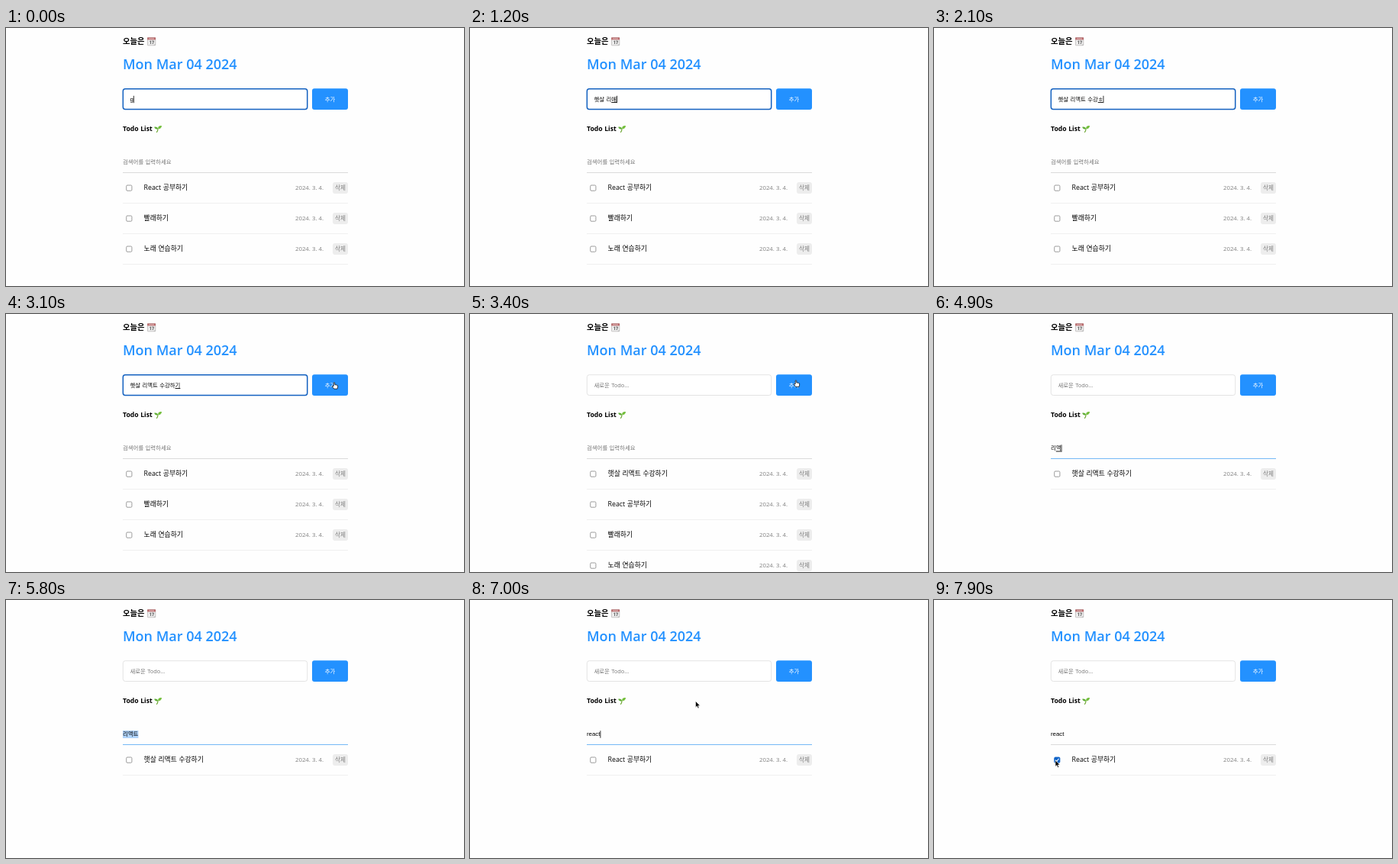
Recreate the animation shown at these times as an HTML page. Size 600x338 px, loop 8 s.

```html
<!DOCTYPE html>
<html lang="ko">
<head>
<meta charset="utf-8">
<title>Todo List</title>
<style>
  html, body { margin: 0; width: 100%; height: 100%; overflow: hidden; background: #fefefe; }
  svg { display: block; width: 600px; height: 338px; }
  text {
    font-family: "Open Sans", "Noto Sans CJK KR", "Noto Sans CJK JP", sans-serif;
    white-space: pre; word-spacing: .4px; fill: #000;
  }
  .today { font-size: 10.3px; font-weight: 700; }
  .date { font-size: 18px; font-weight: 600; fill: #2391ff; word-spacing: 0; }
  .title { font-size: 8.65px; font-weight: 700; }
  .field { font-size: 7.4px; }
  .latin { font-family: "Liberation Sans", Arial, sans-serif; font-size: 7.87px; }
  .hint { fill: #757575; }
  .add { font-size: 7.4px; font-weight: 500; fill: #fff; }
  .item { font-size: 8.8px; font-weight: 500; }
  .day { font-size: 7.8px; fill: #808080; word-spacing: 0; }
  .del { font-size: 7.6px; fill: #808080; }
</style>
</head>
<body>
<svg id="stage" viewBox="0 0 600 338">
  <text class="today" x="153" y="21.2">오늘은</text>
  <g transform="translate(185 12)">
    <rect x=".4" y=".6" width="10.4" height="10.2" rx=".8" fill="#ececec" stroke="#a9a6a6" stroke-width=".6"/>
    <path d="M.2 .4H11V3.4H.2Z" fill="#b9686a"/>
    <path d="M2 1.9H9" stroke="#f3dede" stroke-width=".7"/>
    <path d="M3.4 5.6L4.6 4.9V9M6.2 5.1H8.6L7.1 9" fill="none" stroke="#555" stroke-width=".9"/>
    <path d="M8.2 10.8L10.8 8.4V10.8Z" fill="#bdbdbd"/>
  </g>
  <text class="date" x="153" y="54">Mon Mar 04 2024</text>
  <rect id="box" x="153.3" y="79.7" width="241.4" height="26.8" rx="3"/>
  <rect x="401" y="79.3" width="47" height="27.7" rx="3" fill="#2391ff"/>
  <text class="add" x="424.6" y="95.8" text-anchor="middle">추가</text>
  <text class="title" x="153" y="135">Todo List</text>
  <g transform="translate(194 127)">
    <path d="M3.2 9.8C4.6 8.6 5 7 5.2 4.6" fill="none" stroke="#6aa52f" stroke-width="1.1"/>
    <path d="M5.1 5.4C1.8 6.2 .6 4.6 .3 2.6C3 2 5 3 5.1 5.4Z" fill="#5fae35"/>
    <path d="M5.2 4.8C5 1.6 7 .6 10 1C10 3.8 8 5.6 5.2 4.8Z" fill="#74bf3c"/>
  </g>
  <rect id="line" x="153" y="189" width="295" height="1"/>
  <g id="fields"></g>
  <g id="list"></g>
  <g id="cursor">
    <path id="arrow" d="M0 0V8.2L1.9 6.5L3.2 9.4L4.6 8.8L3.3 5.9H5.9Z" fill="#000" stroke="#fff" stroke-width=".6"/>
    <path id="beam" d="M-2 -4.5Q0 -4.5 0 -3.4Q0 -4.5 2 -4.5M0 -3.4V3.6M-2 4.6Q0 4.6 0 3.5Q0 4.6 2 4.6M-1.1 1.2H1.1" fill="none" stroke="#222" stroke-width=".9"/>
    <path id="hand" d="M-.8 .6Q0 -.5 .8 .6V3.2L2 3.3L3.3 3.6L4.6 4.2Q5 6.4 4 8.6H-.3L-2.8 5.4Q-2.8 4.2 -.8 5.2Z" fill="#fff" stroke="#111" stroke-width=".8" stroke-linejoin="round"/>
  </g>
</svg>
<script>
const LOOP = 8000, STEP = 100;
const NS = 'http://www.w3.org/2000/svg';
const $ = id => document.getElementById(id);

function add(parent, tag, attrs, label) {
  const el = document.createElementNS(NS, tag);
  for (const k in attrs) el.setAttribute(k, attrs[k]);
  if (label) el.textContent = label;
  parent.appendChild(el);
  return el;
}
const set = (el, attrs) => { for (const k in attrs) el.setAttribute(k, attrs[k]); };
const show = (el, on) => { el.style.display = on ? '' : 'none'; };

// [time, text, composing]
const addSteps = [
  [0, 'g'], [100, ''], [300, 'ㅎ', 1], [400, '해', 1], [500, '햇', 1], [600, '햇사', 1],
  [700, '햇살', 1], [800, '햇살 '], [900, '햇살 ㄹ', 1], [1000, '햇살 리', 1],
  [1100, '햇살 링', 1], [1200, '햇살 리애', 1], [1300, '햇살 리액', 1],
  [1400, '햇살 리액ㅌ', 1], [1500, '햇살 리액트', 1], [1600, '햇살 리액트 '],
  [1700, '햇살 리액트 수', 1], [1800, '햇살 리액트 숙', 1], [1900, '햇살 리액트 수가', 1],
  [2000, '햇살 리액트 수강', 1], [2100, '햇살 리액트 수강ㅎ', 1],
  [2200, '햇살 리액트 수강하', 1], [2300, '햇살 리액트 수강하기', 1],
  [3200, '햇살 리액트 수강하기'], [3300, '']
];
const searchSteps = [
  [0, ''], [4500, 'ㄹ', 1], [4600, '리', 1], [4700, '링', 1], [4800, '리애', 1],
  [4900, '리액', 1], [5000, '리액ㅌ', 1], [5100, '리액트', 1], [5500, '리액트'],
  [6100, 'r'], [6300, 'rea'], [6400, 'reac'], [6600, 'react']
];
const at = (steps, t) => steps.filter(s => s[0] <= t).pop();

// [time, x, y]
const paths = [
  [[2700, 403, 52], [2900, 420, 78], [3100, 430, 89.5], [3300, 430, 89.5], [3500, 424, 84],
   [3600, 400, 52], [3700, 300, 115], [3800, 205, 192], [3900, 187, 182], [4000, 186.5, 180.5], [4500, 0, 0]],
  [[6900, 196, 172], [7100, 395, 93], [7300, 250, 180], [7500, 131, 217], [7700, 159, 210], [8000, 159, 210]]
];

function pointer(t) {
  const path = paths.find(p => t >= p[0][0] && t < p[p.length - 1][0]);
  if (!path) return null;
  const i = path.findIndex(p => p[0] > t);
  const a = path[i - 1], b = path[i];
  if (a[0] === 4000) return [a[1], a[2]];
  const k = (t - a[0]) / (b[0] - a[0]);
  return [a[1] + (b[1] - a[1]) * k, a[2] + (b[2] - a[2]) * k];
}

function shapeAt([x, y]) {
  const within = (l, t, r, b) => x >= l && x <= r && y >= t && y <= b;
  if (within(401, 79, 448, 107)) return 'hand';
  if (within(153, 79, 395, 107) || within(153, 165, 448, 189)) return 'beam';
  return 'arrow';
}

function makeField(x, base, hint) {
  const g = $('fields');
  const mark = add(g, 'rect', { x, y: base - 7.3, height: 10, fill: '#b0d4fb' });
  const text = add(g, 'text', { x, y: base });
  const under = add(g, 'rect', { y: base + 1.2, height: .9 });
  const caret = add(g, 'rect', { y: base - 7, width: .8, height: 9.4 });
  return ([, value, composing], caretOn, selected) => {
    text.textContent = value || hint;
    text.setAttribute('class', 'field' + (value ? /^[a-z]/.test(value) ? ' latin' : '' : ' hint'));
    const w = value ? text.getComputedTextLength() : 0;
    const n = value.length - 1;
    const from = n > 0 ? text.getSubStringLength(0, n) : 0;
    show(under, composing);
    set(under, { x: x + from, width: Math.max(0, w - from) });
    show(caret, caretOn);
    set(caret, { x: x + w });
    show(mark, selected);
    set(mark, { width: w });
  };
}
const drawAdd = makeField(162.5, 95.8, '새로운 Todo...');
const drawSearch = makeField(153, 178.3, '검색어를 입력하세요');

const rows = ['햇살 리액트 수강하기', 'React 공부하기', '빨래하기', '노래 연습하기'].map(name => {
  const g = add($('list'), 'g', {});
  const box = add(g, 'rect', { x: 157.7, y: 16, width: 7.2, height: 7.2, rx: 1.3, 'stroke-width': .8 });
  const tick = add(g, 'path', { d: 'M159.2 19.7L160.8 21.4L163.5 17.7', fill: 'none', stroke: '#fff', 'stroke-width': 1.1 });
  add(g, 'text', { class: 'item', x: 180.6, y: 22.3 }, name);
  add(g, 'text', { class: 'day', x: 379, y: 22 }, '2024. 3. 4.');
  add(g, 'rect', { x: 428, y: 12, width: 20, height: 15, rx: 3, fill: '#ededed' });
  add(g, 'text', { class: 'del', x: 438, y: 22.2, 'text-anchor': 'middle' }, '삭제');
  add(g, 'rect', { x: 153, y: 39, width: 295, height: 1, fill: '#f0f0f0' });
  return { name, g, box, tick };
});

function draw(t) {
  const inAdd = t < 3200, inSearch = t >= 3900 && t < 7800;
  const query = at(searchSteps, t);
  const selected = t >= 5800 && t < 6100;

  set($('box'), inAdd
    ? { fill: '#fff', stroke: '#1361c0', 'stroke-width': 1.5 }
    : { fill: '#fff', stroke: '#dcdcdc', 'stroke-width': .8 });
  set($('line'), { fill: inSearch ? '#74b9f6' : '#dadada' });
  drawAdd(at(addSteps, t), inAdd && t < 2700, false);
  drawSearch(query, inSearch && !selected && t < 7200, selected);

  let slot = 0;
  rows.forEach((row, i) => {
    const on = (i > 0 || t >= 3300) && row.name.toLowerCase().includes(query[1]);
    const done = i === 1 && t >= 7900;
    show(row.g, on);
    show(row.tick, done);
    set(row.box, { fill: done ? '#1064c8' : '#fff', stroke: done ? '#1064c8' : '#858585' });
    if (on) set(row.g, { transform: `translate(0 ${190 + 40 * slot++})` });
  });

  const pos = pointer(t);
  show($('cursor'), pos);
  if (pos) {
    const shape = shapeAt(pos);
    set($('cursor'), { transform: `translate(${pos})` });
    for (const id of ['arrow', 'beam', 'hand']) show($(id), id === shape);
  }
}

const start = performance.now();
let last = -1;
function frame() {
  const t = Math.floor((performance.now() - start) % LOOP / STEP) * STEP;
  if (t !== last) draw(last = t);
  requestAnimationFrame(frame);
}
frame();
</script>
</body>
</html>
```
